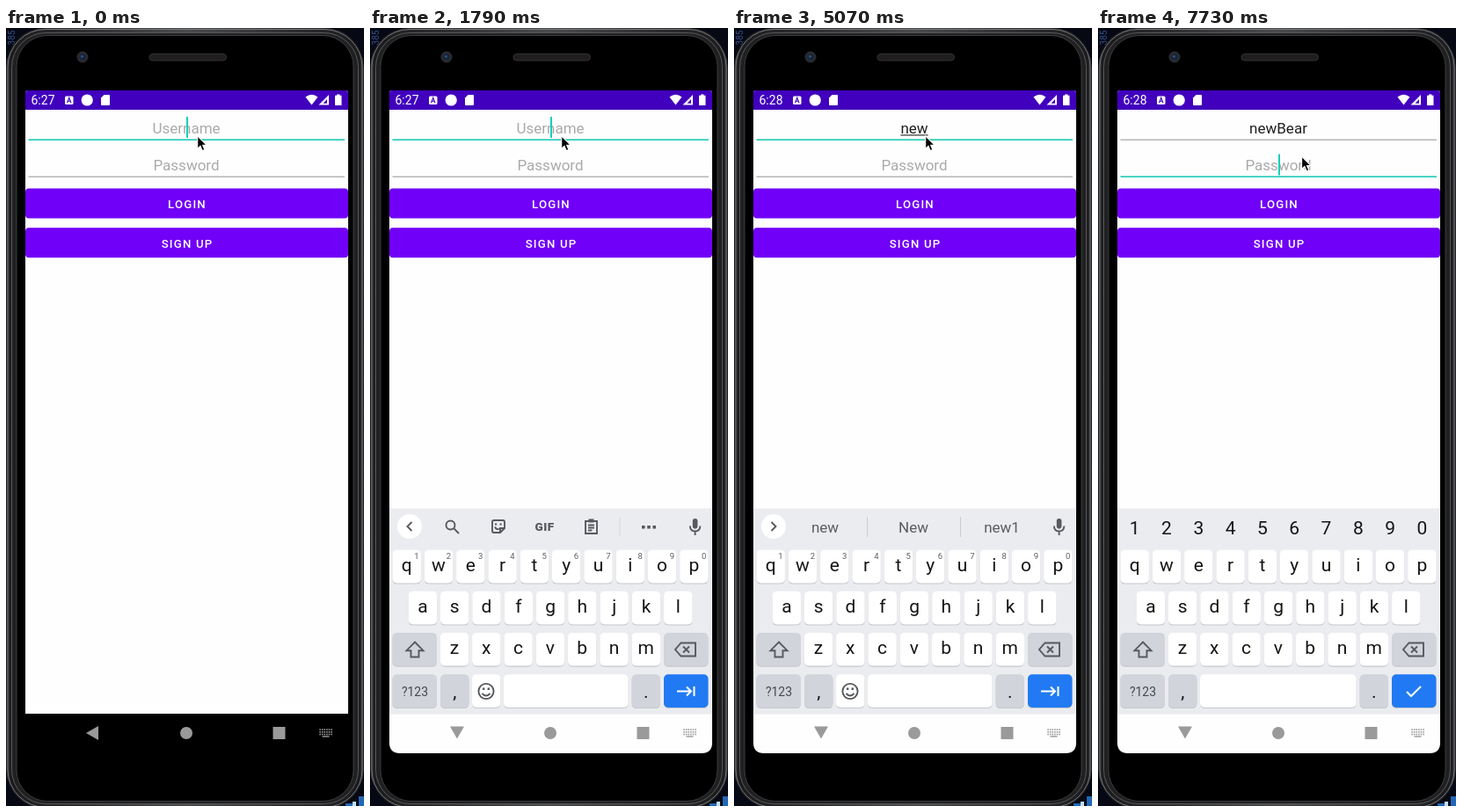
Recreate the animation shown at these times as an HTML page. Size 407 px wide and 885 px high, loop 8 s.

```html
<!DOCTYPE html>
<html lang="en">
<head>
<meta charset="utf-8">
<title>Login form typing</title>
<style>
  html, body { margin: 0; width: 100%; height: 100%; overflow: hidden; background: #060914; }
  svg { display: block; width: 407px; height: 885px; }
  text { font-family: Roboto, "Noto Sans", sans-serif; text-anchor: middle; }
  .field { font-size: 17px; fill: #1f1f1f; }
  .hint { font-size: 17px; fill: #aaa; }
  .btn { font-size: 13.2px; font-weight: 500; letter-spacing: 1.18px; fill: #fff; }
  .key { font-size: 21px; fill: #151515; }
  .sup { font-size: 9.5px; fill: #5c5e62; }
  .word { font-size: 17px; fill: #5a5c60; }
  .line { fill: none; stroke: #56595e; stroke-width: 1.9; }
</style>
</head>
<body>
<svg id="stage" viewBox="0 0 407 885">
  <defs>
    <linearGradient id="rim" x1="0" x2="1" y1="0" y2="0">
      <stop offset="0" stop-color="#3a3b3d"/><stop offset=".012" stop-color="#1b1b1d"/>
      <stop offset=".5" stop-color="#4a4b4d"/>
      <stop offset=".988" stop-color="#1b1b1d"/><stop offset="1" stop-color="#3a3b3d"/>
    </linearGradient>
    <clipPath id="screen"><path d="M22 74q0-3 3-3H386q3 0 3 3V813q0 12-12 12H34q-12 0-12-12Z"/></clipPath>
  </defs>

  <!-- desktop behind the phone -->
  <rect width="407" height="885" fill="#060914"/>
  <text transform="translate(10 11) rotate(-90)" font-size="10" fill="#34508c">385</text>
  <path d="M386 882h9v3h-9zM401 874h6v11h-6z" fill="#2368b8"/>
  <path d="M394 880h4v5h-4z" fill="#c3def4"/>

  <!-- phone body -->
  <rect x=".5" y="0" width="406" height="888" rx="44" fill="url(#rim)"/>
  <rect x="2" y="1.5" width="403" height="885" rx="43" fill="none" stroke="#77797b"/>
  <rect x="6.5" y="5.5" width="394" height="877" rx="39" fill="#202022" stroke="#58595b"/>
  <rect x="12" y="8.5" width="383" height="871" rx="35" fill="#000" stroke="#3b3c3e"/>
  <circle cx="87" cy="33" r="6.5" fill="#292b30"/>
  <circle cx="87" cy="33" r="3.6" fill="#15243a"/>
  <circle cx="86.4" cy="32.4" r="1.4" fill="#35557d"/>
  <rect x="163" y="29.5" width="87.500" height="7.500" rx="3.700" fill="#201d1f" stroke="#343234"/>

  <g clip-path="url(#screen)">
    <rect x="22" y="71" width="367" height="709" fill="#fefefe"/>
    <rect x="22" y="71" width="367" height="22" fill="#4100bd"/>
    <g fill="#fff">
      <text id="clock" x="42" y="87" font-size="14"></text>
      <rect x="67" y="77.500" width="9.500" height="9.500" rx="1.500"/>
      <circle cx="92.200" cy="82" r="6.600"/>
      <path d="M111.500 76h5.500q1 0 1 1v10q0 1-1 1h-8q-1 0-1-1v-7.500z"/>
      <path d="M340.500 78.500q7-5.500 14 0l-7 9z"/>
      <path d="M367 76v11.500h-11.500zm-2 5-4.500 4.800h4.500z" fill-rule="evenodd"/>
      <path d="M376 75.500h3.500v1.300h2V88h-7.500V76.800h2z"/>
    </g>
    <path d="M69.500 85.200l2.250-6 2.250 6m-3.700-2h2.900" fill="none" stroke="#4100bd" stroke-width="1.100"/>

    <text id="userHint" class="hint" x="205" y="120">Username</text>
    <text id="user" class="field" x="205" y="120"></text>
    <rect id="under" y="121.300" height="1.200" fill="#333"/>
    <rect id="userLine" x="25.500" width="359.500"/>
    <text class="hint" x="205" y="162">Password</text>
    <rect id="passLine" x="25.500" width="359.500"/>
    <rect id="caret" width="2" height="24" fill="#16cfbd"/>

    <g fill="#7000f7">
      <rect x="22" y="182.500" width="367" height="34" rx="4"/>
      <rect x="22" y="227.200" width="367" height="34" rx="4"/>
    </g>
    <text class="btn" x="206" y="204.800">LOGIN</text>
    <text class="btn" x="206" y="249.500">SIGN UP</text>

    <rect id="navBack" x="22" y="780" width="367" height="45" fill="#fefefe"/>

    <g id="board">
      <rect x="22" y="546.500" width="367" height="234" fill="#ebecf0"/>
      <g id="bar">
        <circle cx="45" cy="567" r="14" fill="#fff"/>
        <path id="chevron" class="line"/>
      </g>
      <g id="tools">
        <circle class="line" cx="91.500" cy="565.500" r="5"/>
        <path class="line" d="M95.200 569.200l5.800 5.800" stroke-width="2.300"/>
        <path class="line" d="M141 560h10q2 0 2 2v7l-5 5h-7q-2 0-2-2v-10q0-2 2-2zM148 574v-5h5M142 567.500q2 4 5 2"/>
        <path d="M142 563.500h2.200v2h-2.200zm5.500 0h2.200v2h-2.200z" fill="#56595e"/>
        <text x="198.500" y="571.800" font-size="13.500" font-weight="900" letter-spacing=".4" fill="#56595e">GIF</text>
        <path class="line" d="M245 561h13v14h-13zM248 565.500h7m-7 3h7m-7 3h4.500"/>
        <path d="M248.500 558.500h6v4h-6z" fill="#56595e"/>
        <path d="M284 557v21" stroke="#d5d7db"/>
        <path d="M309 566h3.600v3.600h-3.600zm6.200 0h3.600v3.600h-3.600zm6.200 0h3.600v3.600h-3.600z" fill="#56595e"/>
      </g>
      <g id="words">
        <path d="M151.500 556v23M257.500 556v23" stroke="#c9cbd0"/>
      </g>
      <g id="mic">
        <rect x="366.800" y="558" width="5.600" height="11.500" rx="2.800" fill="#56595e"/>
        <path class="line" d="M363.800 566.500q.4 6 5.800 6t5.800-6M369.600 572.500v4.500"/>
      </g>
      <g id="digits"></g>
      <g id="keys"></g>
      <g id="sups"></g>
      <path class="line" d="M51 698.500l9.500 9.700h-5v7.300h-9v-7.300h-5z"/>
      <path class="line" d="M353.500 699.500H370v15h-16.500l-6.500-7.500zM356 703.500l7 7m0-7l-7 7"/>
      <text x="51" y="759.500" font-size="14" fill="#45484d">?123</text>
      <g id="face">
        <circle class="line" cx="132" cy="754.500" r="8.600"/>
        <path class="line" d="M127.500 757q4.500 5 9 0"/>
        <path d="M128 750.500h2.400v2.400H128zm5.600 0h2.400v2.400h-2.400z" fill="#56595e"/>
      </g>
      <path id="enter" fill="none" stroke="#fff" stroke-width="2"/>
    </g>

    <g id="nav" fill="#9a9a9a">
      <path id="back" d="M-8 0L6-8V8z"/>
      <circle cx="205" cy="802" r="7"/>
      <rect x="303.500" y="795" width="14" height="14"/>
      <g id="dots"></g>
    </g>
  </g>

  <path id="mouse" d="M0 0V14.500L3.300 11.500 5.500 16.800 8.200 15.700 6 10.600H10.500Z" fill="#000" stroke="#fff" stroke-width="1.100"/>
</svg>
<script>
const NS = "http://www.w3.org/2000/svg";
const $ = id => document.getElementById(id);

function set(el, attrs) {
  for (const k in attrs) el.setAttribute(k, attrs[k]);
  return el;
}
function add(parent, tag, attrs, text) {
  const el = set(document.createElementNS(NS, tag), attrs);
  if (text) el.textContent = text;
  return parent.appendChild(el);
}
const show = (id, on) => set($(id), { display: on ? "inline" : "none" });

// Keyboard
const keys = $("keys"), PITCH = 36.3;
function cap(x, y, w, fill) {
  add(keys, "rect", { x, y: y + 1.2, width: w, height: 37.6, rx: 5, fill: "#c6c8cd" });
  return add(keys, "rect", { x, y, width: w, height: 37.6, rx: 5, fill });
}
function letters(row, x0, y) {
  [...row].forEach((c, i) => {
    const x = x0 + i * PITCH;
    cap(x - 16.2, y, 32.4, "#fff");
    add(keys, "text", { class: "key", x, y: y + 24.2 }, c);
  });
}
const GREY = "#d1d4da";
letters("qwertyuiop", 41.7, 593.8);
letters("asdfghjkl", 59.9, 640.8);
letters("zxcvbnm", 96, 688);
cap(25.500, 688, 50.500, GREY);
cap(334, 688, 50.500, GREY);
cap(25.500, 735.300, 50.500, GREY);
cap(80, 735.300, 32.400, GREY);
const emojiKey = cap(116, 735.300, 32.400, "#fff");
const space = cap(152, 735.300, 141.500, "#fff");
const spaceShade = space.previousSibling;
cap(297.600, 735.300, 32.400, GREY);
cap(334, 735.300, 50.500, "#217af3");
add(keys, "text", { class: "key", x: 96.2, y: 762, "font-size": 18 }, ",");
add(keys, "text", { class: "key", x: 313.8, y: 762, "font-size": 18 }, ".");
[..."1234567890"].forEach((d, i) => {
  const x = 41.7 + i * PITCH;
  add($("sups"), "text", { class: "sup", x: x + 11.3, y: 604 }, d);
  add($("digits"), "text", { class: "key", x, y: 575.5 }, d);
});
const words = [103.5, 204, 304.5].map(x => add($("words"), "text", { class: "word", x, y: 574 }));

// Input-method icon in the navigation bar
for (let i = 0; i < 18; i++)
  add($("dots"), "rect", { x: 356.3 + i % 6 * 2.6, y: 797.3 + Math.floor(i / 6) * 2.7, width: 1.6, height: 1.6 });
add($("dots"), "rect", { x: 359.5, y: 805.2, width: 8, height: 1.4 });

// Each step overrides part of the state from its time on
const LOOP = 8000;
const steps = [
  [0, { clock: "6:27", user: "", mark: 0, caret: 1, focus: "user", board: 0, drop: 0, turn: 0, words: null, mouse: [217.7, 122.8], digits: 0 }],
  [150, { board: 1, drop: 10, turn: -45 }],
  [300, { drop: 0, turn: -90, caret: 0 }],
  [900, { caret: 1 }],
  [1350, { caret: 0 }],
  [1790, { caret: 1 }],
  [2390, { caret: 0 }],
  [2840, { caret: 1 }],
  [3140, { user: "n", mark: 1 }],
  [3280, { user: "new", mark: 2, words: ["ne", "need", "new"] }],
  [3580, { mark: 3, words: ["new", "New", "new1"] }],
  [3870, { clock: "6:28" }],
  [4020, { caret: 0 }],
  [4620, { caret: 1 }],
  [5070, { caret: 0 }],
  [5210, { user: "newB", mark: 3, caret: 1 }],
  [5510, { user: "newBe", mark: 4, words: ["newB", "new", "news"] }],
  [5660, { user: "newBea", mark: 5, words: ["newBe", "news", "newsletter"] }],
  [5960, { user: "newBear", mark: 6, words: ["newBea", "news", "newsletter"] }],
  [6110, { mark: 7, words: ["newBear", "news", "newsletter"] }],
  [6260, { mouse: [220, 126] }],
  [6400, { mouse: [227, 138] }],
  [6550, { mouse: [231.6, 146] }],
  [6690, { focus: "pass", mark: 0 }],
  [6840, { digits: 1 }],
  [7280, { caret: 0 }],
  [7730, { caret: 1 }]
];

function fieldLine(id, y, on) {
  set($(id), { y: on ? y - .3 : y, height: on ? 1.7 : 1.1, fill: on ? "#2bcdb8" : "#9b9b9b" });
}

function draw(s) {
  const onUser = s.focus === "user", user = $("user");
  $("clock").textContent = s.clock;
  user.textContent = s.user;
  show("userHint", !s.user);
  const width = s.user ? user.getComputedTextLength() : 0;
  set($("under"), { x: 205 - width / 2, width: s.mark ? user.getSubStringLength(0, s.mark) : 0 });
  fieldLine("userLine", 126.6, onUser);
  fieldLine("passLine", 168.6, !onUser);
  show("caret", s.caret);
  set($("caret"), onUser ? { x: 205 + width / 2, y: 101 } : { x: 205, y: 143.5 });

  show("board", s.board);
  show("navBack", s.board);
  set($("board"), { transform: `translate(0 ${s.drop})` });
  show("bar", !s.digits);
  show("mic", !s.digits);
  show("tools", !s.words);
  show("words", s.words && !s.digits);
  show("digits", s.digits);
  show("sups", !s.digits);
  show("face", !s.digits);
  set($("chevron"), { d: s.words ? "M42.5 562l5 5-5 5" : "M47.5 562l-5 5 5 5" });
  words.forEach((w, i) => { w.textContent = s.words ? s.words[i] : ""; });

  emojiKey.style.display = emojiKey.previousSibling.style.display = s.digits ? "none" : "";
  for (const r of [space, spaceShade])
    set(r, s.digits ? { x: 116, width: 177.5 } : { x: 152, width: 141.5 });
  set($("enter"), { d: s.digits ? "M351 755l5 5 11-11" : "M349 754.5h15.500M360 749.500l5 5-5 5M368.500 749v11" });

  set($("back"), { transform: `translate(99 ${s.turn ? 800.5 : 802}) rotate(${s.turn})` });
  set($("mouse"), { transform: `translate(${s.mouse})` });
}

const start = performance.now();
let shown = -1;
function tick(now) {
  const t = Math.max(0, now - start) % LOOP;
  const past = steps.filter(([at]) => at <= t);
  if (past.length !== shown) {
    shown = past.length;
    draw(Object.assign({}, ...past.map(p => p[1])));
  }
  requestAnimationFrame(tick);
}
tick(start);
</script>
</body>
</html>
```
